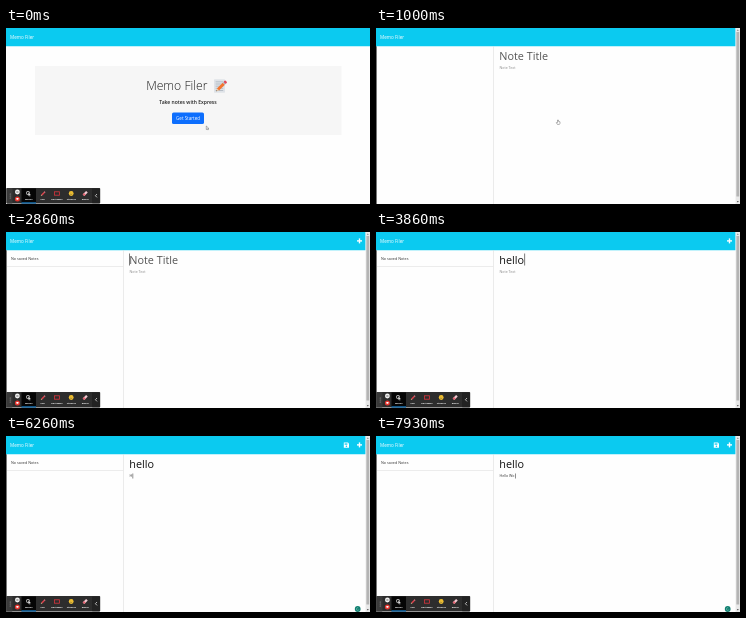
Write an HTML page with a canvas that moves like this. It is 364 px wide and 176 px high and loops after 8 s.

```html
<!DOCTYPE html>
<html lang="en">
<head>
<meta charset="utf-8">
<title>Memo Filer</title>
<style>
html, body { margin: 0; width: 100%; height: 100%; overflow: hidden; background: #fff; }
canvas { display: block; width: 364px; height: 176px; }
</style>
</head>
<body>
<canvas id="stage"></canvas>
<script>
const W = 364, H = 176, LOOP = 8000;
const canvas = document.getElementById('stage');
const ctx = canvas.getContext('2d');
const dpr = window.devicePixelRatio || 1;
canvas.width = W * dpr;
canvas.height = H * dpr;

const FONT = '"Open Sans", "Noto Sans", sans-serif';
const CYAN = '#0bcaf0';
const APP = 'Memo Filer';

// [time, text] steps of the two fields
const titleKeys = [[3130, 'h'], [3330, 'he'], [3530, 'hel'], [3660, 'hell'], [3860, 'hello']];
const bodyKeys = [[6200, 'H'], [6460, 'He'], [6730, 'Hel'], [6800, 'Hell'], [6860, 'Hello'],
  [7330, 'Hello '], [7660, 'Hello W'], [7930, 'Hello Wo']];

const typed = (keys, t) => keys.reduce((s, [at, text]) => t >= at ? text : s, '');
const clamp = v => Math.max(0, Math.min(1, v));

function glide(t, t0, t1, from, to) {
  const u = clamp((t - t0) / (t1 - t0));
  const e = u * u * (3 - 2 * u);
  return from.map((v, i) => v + (to[i] - v) * e);
}

function rect(x, y, w, h, color, r = 0) {
  ctx.fillStyle = color;
  ctx.beginPath();
  ctx.roundRect(x, y, w, h, r);
  ctx.fill();
}

function disc(x, y, r, color) {
  ctx.fillStyle = color;
  ctx.beginPath();
  ctx.arc(x, y, r, 0, Math.PI * 2);
  ctx.fill();
}

function poly(points, color, stroke, width = 0.5) {
  ctx.beginPath();
  points.forEach(([x, y]) => ctx.lineTo(x, y));
  if (color) {
    ctx.closePath();
    ctx.fillStyle = color;
    ctx.fill();
  }
  if (stroke) {
    ctx.strokeStyle = stroke;
    ctx.lineWidth = width;
    ctx.stroke();
  }
}

function label(text, x, y, size, color, weight = 400, align = 'left') {
  ctx.font = `${weight} ${size}px ${FONT}`;
  ctx.textAlign = align;
  ctx.fillStyle = color;
  ctx.fillText(text, x, y);
  return ctx.measureText(text).width;
}

function at(x, y, angle, draw) {
  ctx.save();
  ctx.translate(x, y);
  ctx.rotate(angle);
  draw();
  ctx.restore();
}

function pencil(x, y, len, wide, color) {
  at(x, y, -Math.PI / 4, () => {
    rect(0, -wide / 2, len * 0.75, wide, color);
    rect(len * 0.75, -wide / 2, len * 0.25, wide, '#e8808c', 0.4);
    poly([[0, -wide / 2], [-wide, 0], [0, wide / 2]], '#d9b48c');
  });
}

function memo() {
  rect(208, 51.3, 11, 13.4, '#dfe3e8', 0.6);
  for (let i = 0; i < 5; i++) rect(209.6, 53.6 + i * 2.1, 7.6, 0.6, '#9aa6b2');
  at(212, 61.5, -Math.PI / 4, () => {
    rect(0, -1.5, 8.2, 3, '#f4752f');
    rect(8.2, -1.5, 1, 3, '#a9b4bd');
    rect(9.2, -1.5, 2.4, 3, '#e2485b', 0.8);
    poly([[0, -1.5], [-2.6, 0], [0, 1.5]], '#f0c8a0');
    poly([[-1.6, -0.6], [-2.6, 0], [-1.6, 0.6]], '#333');
  });
}

function arrow(x, y) {
  poly([[x, y], [x, y + 3.6], [x + 0.9, y + 2.8], [x + 1.6, y + 4], [x + 2.1, y + 3.7],
    [x + 1.5, y + 2.6], [x + 2.6, y + 2.5], [x, y]], '#fff', '#555', 0.45);
}

function hand(x, y) {
  poly([[x - 0.5, y], [x + 0.4, y], [x + 0.5, y + 1.4], [x + 2, y + 1.8], [x + 2, y + 3.3],
    [x + 1.4, y + 4.4], [x - 0.6, y + 4.4], [x - 1.7, y + 2.6], [x - 0.5, y + 2.5],
    [x - 0.5, y]], '#fff', '#555', 0.45);
}

function beam(x, y) {
  rect(x - 0.2, y - 2, 0.4, 4, '#777');
  rect(x - 0.8, y - 2.2, 1.6, 0.35, '#777');
  rect(x - 0.8, y + 1.9, 1.6, 0.35, '#777');
}

function toolbar() {
  rect(0.5, 160, 93.7, 15.6, '#2d2d2d', 0.8);
  rect(0.5, 160, 6, 15.6, '#3a3a3a', 0.8);
  for (let i = 0; i < 3; i++) disc(4.2, 166 + i * 2, 0.5, '#aaa');
  disc(11.4, 164, 2.4, '#f2f2f2');
  poly([[10.5, 163.1], [12.3, 164.9]], null, '#444');
  poly([[12.3, 163.1], [10.5, 164.9]], null, '#444');
  disc(11.4, 170.9, 2.5, '#e5342d');
  rect(10.5, 170, 1.8, 1.8, '#fff', 0.2);
  rect(15.5, 160.4, 14.5, 15, '#050505');
  rect(15.5, 174.4, 14.5, 1.1, '#1687d9');

  disc(22, 165, 1.9, '#d8d8d8');
  disc(22, 165, 1.2, '#111');
  arrow(22.2, 164.4);
  pencil(35.8, 167, 4.6, 1.5, '#e0404c');
  ctx.strokeStyle = '#d9343c';
  ctx.lineWidth = 0.8;
  ctx.strokeRect(48.5, 163.8, 5, 3.4);
  disc(65.2, 165.5, 2.4, '#f5c332');
  disc(64.4, 165, 0.35, '#553');
  disc(66, 165, 0.35, '#553');
  rect(64.2, 166.2, 2, 0.4, '#553');
  at(79.2, 165.5, -Math.PI / 4, () => {
    rect(-2.5, -1.2, 5, 2.4, '#f0c8d0', 0.4);
    rect(-2.5, -1.2, 2, 2.4, '#e5616f', 0.4);
  });
  [['Mouse', 22.7], ['Pen', 36.7], ['Rectangle', 51], ['Stickers', 65.3], ['Eraser', 79.3]]
    .forEach(([name, x]) => label(name, x, 171.5, 2.3, '#fff', 700, 'center'));
  rect(86, 160.4, 8, 14.8, '#222', 0.6);
  poly([[91, 166], [89.4, 167.7], [91, 169.4]], null, '#ddd', 0.8);
}

function header(width) {
  rect(0, 0, width, 18.3, CYAN);
  label(APP, 4, 11.2, 4.6, '#fff');
}

function home(t) {
  header(W);
  rect(29, 38, 306.5, 69, '#f6f6f6');
  label(APP, 170.8, 62, 12.2, '#222', 300, 'center');
  memo();
  label('Take notes with Express', 182, 75.8, 5, '#252525', 600, 'center');
  const p = glide(t, 60, 500, [200.3, 98], [182, 92]);
  const hover = p[0] < 198 && p[1] < 96;
  rect(166, 84.6, 32, 11.4, hover ? '#0b59d0' : '#0d6efd', 1.6);
  label('Get Started', 182, 92, 4.5, '#fff', 400, 'center');
  (hover ? hand : arrow)(...p);
  toolbar();
}

function scrollbar() {
  rect(359.6, 0, 4.4, H, '#e9e9e9');
  rect(360.4, 4, 2.8, 164.5, '#b4b4b4');
  poly([[360.8, 2.8], [361.8, 1.5], [362.8, 2.8]], '#777');
  poly([[360.8, 173], [361.8, 174.4], [362.8, 173]], '#555');
}

function saveIcon() {
  poly([[337.8, 6.6], [342, 6.6], [343, 7.6], [343, 11.8], [337.8, 11.8]], '#fff');
  rect(338.6, 7.4, 2.8, 1.3, CYAN);
  disc(340.4, 10.2, 0.8, CYAN);
}

function field(text, hint, x, y, size, ink, pale) {
  const w = label(text || hint, x, y, size, text ? ink : pale);
  return text ? x + w + 0.5 : x + 0.2;
}

function notes(t) {
  header(359.6);
  rect(0, 18.3, 0.8, H, '#555');
  rect(117.2, 18.3, 0.5, H, '#d8d8d8');
  scrollbar();

  if (t >= 1130) {
    label('No saved Notes', 5, 27.8, 3.75, '#333');
    rect(1, 34.2, 116.3, 0.5, '#dcdcdc');
    rect(351, 8.2, 5, 1.4, '#fff');
    rect(352.8, 6.4, 1.4, 5, '#fff');
  }

  const body = typed(bodyKeys, t);
  const titleEnd = field(typed(titleKeys, t), 'Note Title', 123.3, 32, 10.85, '#111', '#555');
  const bodyEnd = field(body, 'Note Text', 123.5, 41.4, 3.6, '#333', '#8a8a8a');

  const titleCaret = (t >= 1930 && t < 2330) || (t >= 2860 && t < 4400) || (t >= 4860 && t < 5660);
  if (titleCaret) rect(titleEnd - 0.1, 21.4, 0.6, 12.2, '#222');
  if (t >= 5660) rect(bodyEnd, 37.6, 0.5, 4.8, '#222');

  if (body) saveIcon();
  if (t >= 5730) {
    disc(351.7, 173, 2.9, '#0f7f70');
    ctx.strokeStyle = '#bfe5dd';
    ctx.lineWidth = 0.4;
    ctx.beginPath();
    ctx.arc(351.7, 173, 1.3, 0.3, 5.2);
    ctx.stroke();
  }

  if (t < 1530) hand(182, 92);
  else if (t >= 1860 && t < 2000) beam(160, 29);
  else if (t >= 5200 && t < 6200) beam(...glide(t, 5330, 5500, [158.5, 53], [145, 42]));
  if (t >= 1260) toolbar();
}

function frame(now) {
  const t = now % LOOP;
  ctx.setTransform(dpr, 0, 0, dpr, 0, 0);
  rect(0, 0, W, H, '#fefefe');
  if (t < 930) home(t);
  else notes(t);
}

const start = performance.now();
function tick() {
  frame(performance.now() - start);
  requestAnimationFrame(tick);
}
tick();
</script>
</body>
</html>
```
